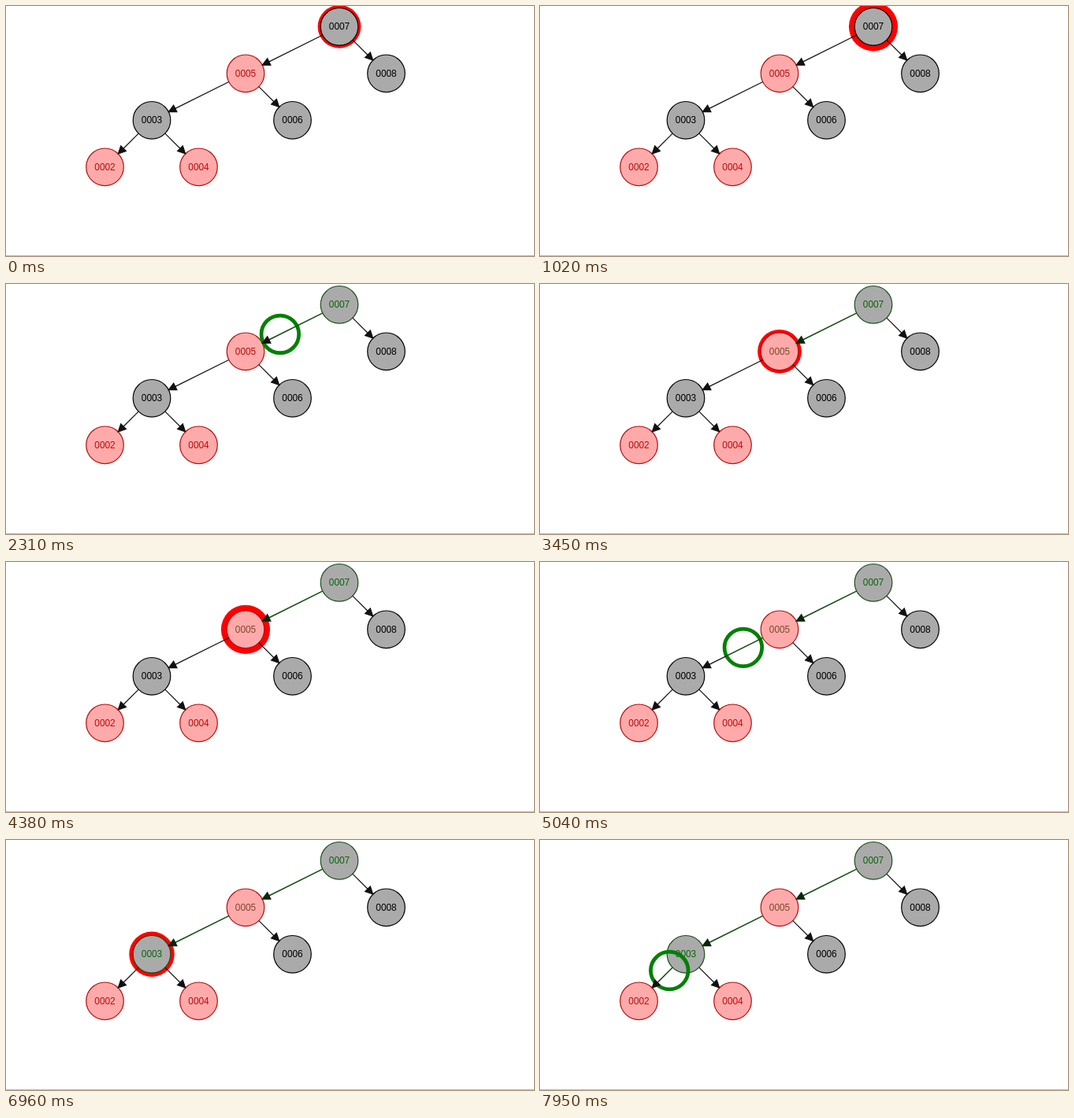
An HTML page with a canvas that plays this animation: 670 px wide and 318 px high, repeating every 8000 ms.

```html
<!DOCTYPE html>
<html lang="en">
<head>
<meta charset="utf-8">
<title>Tree descent</title>
<style>
  html, body { margin: 0; width: 100%; height: 100%; overflow: hidden; background: #fff; }
  canvas { display: block; }
</style>
</head>
<body>
<canvas id="stage" width="670" height="318"></canvas>
<script>
const ctx = document.getElementById('stage').getContext('2d');
const LOOP = 8000, SCALE = 1.19, RADIUS = 20 * SCALE, STEP = 50 * SCALE;
const PULSE = 840; // ms from thinnest to thickest highlight

const BLACK = { fill: '#aaaaaa', line: '#000000', tintLine: '#174f17', tintText: '#0a660a' };
const RED = { fill: '#ffaaaa', line: '#b80d0d', tintLine: '#b80d0d', tintText: '#7d4a2a' };

// Column and row are counted in steps from the root; tintAt is when the ring has crossed the label.
const node = (label, column, row, style, tintAt = Infinity) =>
  ({ label, x: 423 + column * STEP, y: 26.3 + row * STEP, style, tintAt });
const n7 = node('0007', 0, 0, BLACK, 1680);
const n8 = node('0008', 1, 1, BLACK);
const n5 = node('0005', -2, 1, RED, 2600);
const n6 = node('0006', -1, 2, BLACK);
const n3 = node('0003', -4, 2, BLACK, 5680);
const n2 = node('0002', -5, 3, RED);
const n4 = node('0004', -3, 3, RED);
const nodes = [n7, n8, n5, n6, n3, n2, n4];

const moves = [
  { from: n7, to: n5, start: 1430, end: 2825 },
  { from: n5, to: n3, start: 4505, end: 5888 },
  { from: n3, to: n2, start: 7469, end: 8852 }
];
const edges = [...moves, { from: n7, to: n8 }, { from: n5, to: n6 }, { from: n3, to: n4 }];

function circle(x, y, radius) {
  ctx.beginPath();
  ctx.arc(x, y, radius, 0, 2 * Math.PI);
}

function drawHighlight(t) {
  const next = moves.find(move => t < move.end);
  if (t >= next.start) return;
  const wave = 1 - Math.abs((t / PULSE) % 2 - 1);
  circle(next.from.x, next.from.y, RADIUS + (3 + 4 * wave) * SCALE);
  ctx.fillStyle = '#ff0000';
  ctx.fill();
}

function drawNode({ label, x, y, style, tintAt }, t) {
  const tinted = t >= tintAt;
  circle(x, y, RADIUS);
  ctx.fillStyle = style.fill;
  ctx.fill();
  ctx.lineWidth = SCALE;
  ctx.strokeStyle = tinted ? style.tintLine : style.line;
  ctx.stroke();
  ctx.fillStyle = tinted ? style.tintText : style.line;
  ctx.fillText(label, x, y + 0.5);
}

function drawRing(t) {
  const move = moves.find(m => t >= m.start && t < m.end);
  if (!move) return;
  const p = (t - move.start) / (move.end - move.start);
  const { from, to } = move;
  circle(from.x + (to.x - from.x) * p, from.y + (to.y - from.y) * p, RADIUS);
  ctx.lineWidth = 4 * SCALE;
  ctx.strokeStyle = '#008000';
  ctx.stroke();
}

function drawEdge({ from, to, start, end }, t) {
  const dx = to.x - from.x, dy = to.y - from.y, length = Math.hypot(dx, dy);
  const tip = length - RADIUS, base = tip - 8 * SCALE, half = 4 * SCALE;
  const line = (a, b, color) => {
    ctx.beginPath();
    ctx.moveTo(a, 0);
    ctx.lineTo(b, 0);
    ctx.strokeStyle = color;
    ctx.stroke();
  };
  ctx.save();
  ctx.translate(from.x, from.y);
  ctx.rotate(Math.atan2(dy, dx));
  ctx.lineWidth = SCALE;
  line(RADIUS, base, '#111111');
  let headColor = '#111111';
  if (t >= start) {
    // The passing ring leaves the line green up to its leading side.
    const front = (t - start) / (end - start) * length + RADIUS;
    line(RADIUS, Math.min(front, base), '#1a601a');
    if (front >= tip) headColor = '#0b260b';
  }
  ctx.beginPath();
  ctx.moveTo(tip, 0);
  ctx.lineTo(base, half);
  ctx.lineTo(base, -half);
  ctx.closePath();
  ctx.fillStyle = ctx.strokeStyle = headColor;
  ctx.fill();
  ctx.stroke();
  ctx.restore();
}

function draw(t) {
  ctx.fillStyle = '#ffffff';
  ctx.fillRect(0, 0, 670, 318);
  ctx.fillStyle = '#bdbdbd';
  ctx.fillRect(0, 317, 670, 1);
  ctx.font = `${10 * SCALE}px "Liberation Sans", Arial, sans-serif`;
  ctx.textAlign = 'center';
  ctx.textBaseline = 'middle';
  drawHighlight(t);
  nodes.forEach(n => drawNode(n, t));
  drawRing(t);
  edges.forEach(e => drawEdge(e, t));
}

const began = performance.now();
function tick() {
  draw((performance.now() - began) % LOOP);
  requestAnimationFrame(tick);
}
tick();
</script>
</body>
</html>
```
